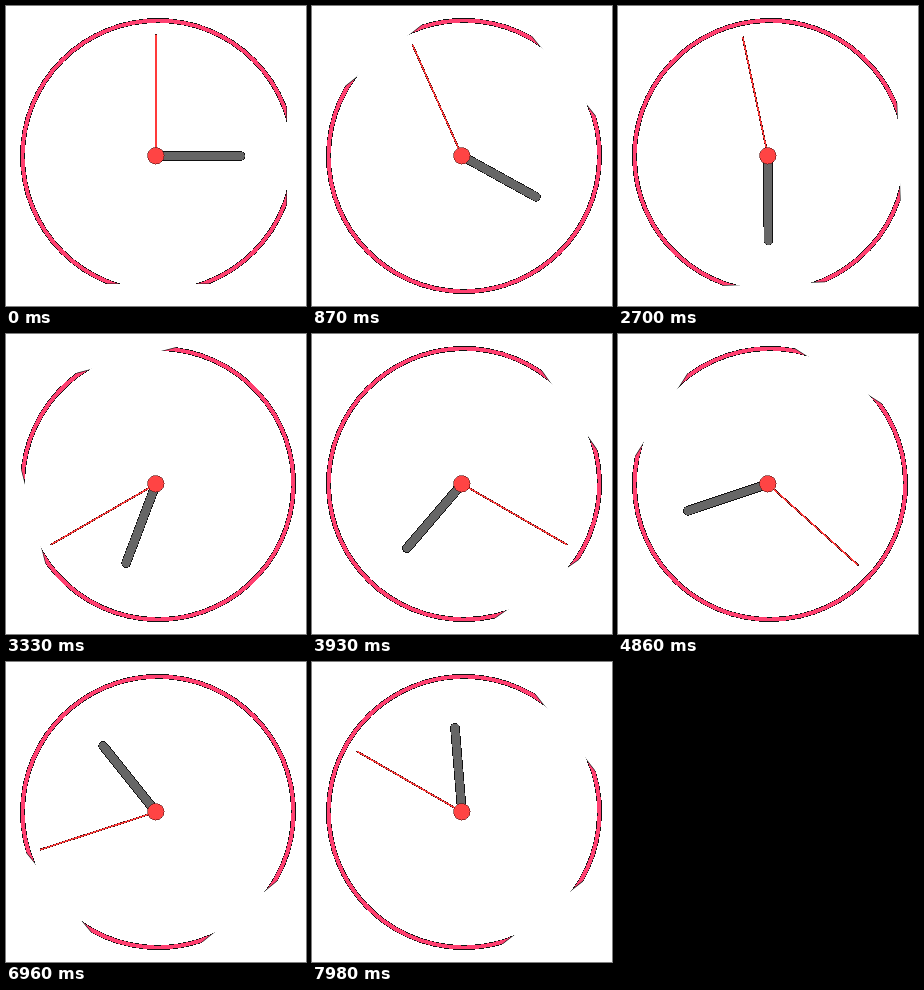
Write an HTML page that moves like this. It is 300 by 300 pixels and loops after 8000 ms.

```html
<!DOCTYPE html>
<html lang="en">
<head>
<meta charset="utf-8">
<title>Clock</title>
<style>
  html, body { margin: 0; width: 100%; height: 100%; overflow: hidden; background: #fff; }
  svg { display: block; width: 100vw; height: 100vh; }
  line, circle, rect { shape-rendering: crispEdges; }
  #ring circle { fill: none; }
</style>
</head>
<body>
<svg viewBox="0 0 300 300">
  <defs>
    <clipPath id="trim"><rect x="-145" y="-145" width="274" height="273"/></clipPath>
    <clipPath id="inset"><rect x="-145" y="-145" width="273.4" height="272.4"/></clipPath>
  </defs>
  <g id="ring">
    <g clip-path="url(#trim)"><circle r="135.5" stroke="#111" stroke-width="5"/></g>
    <g clip-path="url(#inset)"><circle r="135.5" stroke="#ff4070" stroke-width="3.8"/></g>
  </g>
  <g id="hour" stroke-linecap="round">
    <line y2="-84.6" stroke="#111" stroke-width="9.6"/>
    <line y2="-84.6" stroke="#666" stroke-width="8.2"/>
  </g>
  <g id="minute">
    <line y2="-122" stroke="#4a1010" stroke-width="2"/>
    <line y2="-121.5" stroke="#ff3a3a" stroke-width="1.3"/>
  </g>
  <circle cx="149.8" cy="149.8" r="8.3" fill="#ff4444" stroke="#5a1414" stroke-width=".6"/>
</svg>
<script>
  const LOOP = 8000, STEP = 30;
  const RATE = 0.9972; // hour-hand degrees per step
  const ring = document.getElementById('ring');
  const hour = document.getElementById('hour');
  const minute = document.getElementById('minute');

  function pose(el, x, y, angle) {
    el.setAttribute('transform', `translate(${x} ${y}) rotate(${angle})`);
  }

  function draw(time) {
    const turn = Math.floor((time % LOOP) / STEP) * RATE;
    pose(ring, 152, 150, turn * 8);
    pose(hour, 150, 150, 90 + turn);
    pose(minute, 150, 150, Math.floor(turn) * 12); // ticks, never sweeps
  }

  const start = performance.now();
  function loop() {
    draw(performance.now() - start);
    requestAnimationFrame(loop);
  }
  loop();
</script>
</body>
</html>
```
